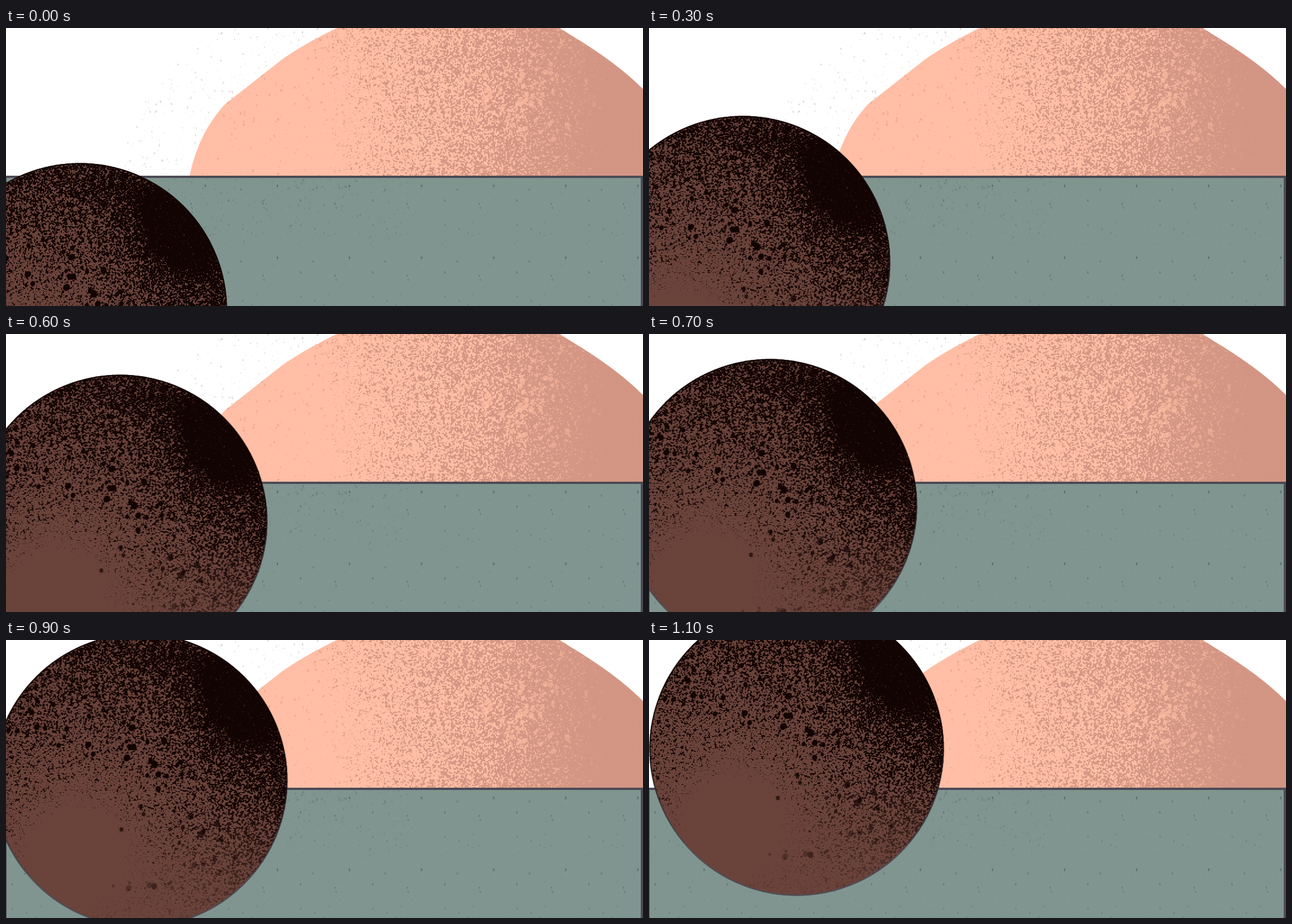
These frames come from a looping animation (1131 by 495 pixels, 1.2 s). An HTML page with a canvas:

```html
<!DOCTYPE html>
<html lang="en">
<head>
<meta charset="utf-8">
<title>Rising ball</title>
<style>
  html, body { margin: 0; width: 100%; height: 100%; overflow: hidden; background: #fff; }
  #stage { position: relative; width: 1131px; height: 495px; overflow: hidden; }
  canvas { position: absolute; left: 0; top: 0; display: block; }
</style>
</head>
<body>
<div id="stage">
  <canvas id="scene" width="1131" height="495"></canvas>
  <canvas id="ball" width="526" height="526"></canvas>
</div>
<script>
const W = 1131, H = 495, HORIZON = 263;
const SIZE = 526, C = SIZE / 2, R = 261.5;
const scene = document.getElementById('scene').getContext('2d');
const ballEl = document.getElementById('ball');
const ball = ballEl.getContext('2d');

const clamp = (v, lo = 0, hi = 1) => Math.max(lo, Math.min(hi, v));
const lerp = (a, b, t) => a + (b - a) * t;
const bell = (x, y, w, h) => Math.exp(-((x / w) ** 2 + (y / h) ** 2));
function smooth(a, b, x) {
  const t = clamp((x - a) / (b - a));
  return t * t * (3 - 2 * t);
}

function seeded(seed) {
  return () => (seed = (Math.imul(seed, 1664525) + 1013904223) >>> 0) / 4294967296;
}

function hash(x, y) {
  let n = Math.imul(x, 374761393) + Math.imul(y, 668265263);
  n = Math.imul(n ^ (n >>> 13), 1274126177);
  return ((n ^ (n >>> 16)) >>> 0) / 4294967296;
}

function noise(x, y) {
  const i = Math.floor(x), j = Math.floor(y), u = x - i, v = y - j;
  return lerp(lerp(hash(i, j), hash(i + 1, j), u),
              lerp(hash(i, j + 1), hash(i + 1, j + 1), u), v);
}

// Sprayed grain; shade(x, y) gives [coverage, opacity]
function grain(w, h, cell, rgb, shade) {
  const c = document.createElement('canvas');
  c.width = w;
  c.height = h;
  const g = c.getContext('2d'), img = g.createImageData(w, h);
  for (let y = 0, k = 0; y < h; y++) {
    for (let x = 0; x < w; x++, k += 4) {
      const [cover, alpha] = shade(x, y);
      const d = clamp(cover, 0.001, 0.985);
      const cut = 0.5 + Math.log(d / (1 - d)) / 9;
      const a = clamp((cut - noise(x / cell, y / cell)) * 8 + 0.5);
      img.data.set([...rgb, 255 * a * alpha], k);
    }
  }
  g.putImageData(img, 0, 0);
  return c;
}

function fleck(g, x, y, r, rnd, flat = 0.55) {
  g.beginPath();
  g.ellipse(x, y, r, r * flat, 1 + rnd() * 1.6, 0, 7);
  g.fill();
}

function drawDust() {
  const rnd = seeded(11);
  for (let i = 0; i < 1200; i++) {
    const a = Math.PI * (1 + rnd() / 2), r = 365 - 230 * rnd();
    const x = 560 + Math.cos(a) * r, y = 318 + Math.sin(a) * r;
    scene.fillStyle = `rgba(150,128,120,${0.1 + rnd() * 0.28})`;
    fleck(scene, x, y, 0.5 + rnd() ** 4 * 2, rnd);
  }
}

function drawHill() {
  const rnd = seeded(5);
  scene.save();
  scene.clip(new Path2D(`M326 264C335 220 352 178 385 140Q390 134 400 127
    L490 56Q525 31 587 0H983L1000 11Q1085 62 1131 109V264Z`));
  scene.fillStyle = '#ffbea5';
  scene.fillRect(320, 0, W, HORIZON);

  scene.fillStyle = 'rgba(211,149,131,.5)';
  for (let i = 0; i < 520; i++) {
    fleck(scene, 330 + rnd() * 340, rnd() * 264, 0.6 + rnd() ** 4 * 2.2, rnd);
  }
  const left = 480;
  scene.drawImage(grain(W - left, 264, 2.1, [211, 149, 131], (x, y) => {
    const lift = 60 * clamp(1 - y / 110) * clamp((400 - x) / 250);
    return [smooth(520, 1120, left + x + lift), 0.95];
  }), left, 0);

  const veil = scene.createLinearGradient(860, 0, 1090, 0);
  veil.addColorStop(0, 'rgba(211,149,131,0)');
  veil.addColorStop(1, 'rgba(211,149,131,.85)');
  scene.fillStyle = veil;
  scene.fillRect(860, 0, W - 860, 264);

  for (let i = 0; i < 90; i++) {
    const x = 780 + (rnd() + rnd()) * 140, y = 20 + (rnd() + rnd()) * 105;
    scene.fillStyle = `rgba(250,184,158,${clamp((1090 - x) / 230, 0.1, 0.75)})`;
    fleck(scene, x, y, 1.5 + rnd() * 4, rnd, 0.85);
  }
  scene.restore();
}

function drawFloor() {
  const rnd = seeded(29), tile = 128;
  scene.fillStyle = '#80958f';
  scene.fillRect(0, HORIZON, W, H - HORIZON);
  scene.fillStyle = '#4c4a55';
  scene.fillRect(0, HORIZON, W, 4);
  scene.fillRect(W - 4, HORIZON, 4, H - HORIZON);
  scene.fillRect(0, HORIZON, 1, H - HORIZON);

  // The same specks repeat in every tile
  for (let i = 0; i < 70; i++) {
    const x = rnd() * tile, y = rnd() * tile, big = rnd() ** 5;
    scene.fillStyle = `rgba(62,78,78,${0.08 + rnd() * 0.14 + big * 0.3})`;
    for (let ty = 256 + y; ty < H; ty += tile) {
      if (ty < HORIZON + 1) continue;
      for (let tx = x; tx < W; tx += tile) fleck(scene, tx, ty, 0.6 + big * 1.8, seeded(i));
    }
  }
  for (let i = 0; i < 380; i++) {
    scene.fillStyle = `rgba(80,105,102,${0.15 + rnd() * 0.3})`;
    fleck(scene, 270 + rnd() * 450, 268 + rnd() ** 1.6 * 120, 0.6 + rnd() ** 3 * 2.2, rnd);
  }
}

function drawBall() {
  const rnd = seeded(71), dark = [18, 4, 2], top = 70;
  const fade = y => clamp(1 - (y - 260) / 270, 0.1, 1);
  ball.save();
  ball.beginPath();
  ball.arc(C, C, R, 0, 7);
  ball.clip();
  ball.fillStyle = '#6a433b';
  ball.fillRect(0, 0, SIZE, SIZE);

  // Coverage grows away from the lit lower left, with a dense core upper right
  ball.drawImage(grain(SIZE, SIZE, 2, dark, (x, y) => {
    const far = clamp((Math.hypot(x - 150, y - 395) - 60) / 330);
    const low = 1 - 0.45 * smooth(300, 520, y);
    return [0.8 * far ** 1.6 * low + 0.42 * bell(x - 425, y - 135, 85, 95), fade(y - 40)];
  }), 0, 0);

  // Drops spread around a line that slopes down to the right
  const drops = (n, x0, y0, w, h, slope) => {
    for (let i = 0; i < n; i++) {
      const x = rnd() * w, y = y0 + x * slope + (rnd() + rnd() - 1) * h;
      ball.fillStyle = `rgba(${dark},${fade(y)})`;
      fleck(ball, x0 + x, y, 2 + rnd() ** 2 * 5, rnd, 0.85);
    }
  };
  drops(70, 20, 130, 360, 75, 0.3);
  drops(22, 205, 310, 230, 60, 0.4);
  drops(10, 195, 455, 125, 10, -0.05);
  ball.restore();

  const edge = ball.createLinearGradient(0, 240, 0, 440);
  edge.addColorStop(0, '#120605');
  edge.addColorStop(1, '#4c4e5b');
  ball.strokeStyle = edge;
  ball.lineWidth = 2;
  ball.beginPath();
  ball.arc(C, C, R - 1, 0, 7);
  ball.stroke();
}

drawDust();
drawHill();
drawFloor();
drawBall();

// Twelve held poses per loop along a straight line
const at = (cx, cy) => `translate(${cx - C}px, ${cy - C}px)`;
ballEl.animate(
  [{ transform: at(131, 502) }, { transform: at(274, 166) }],
  { duration: 1200, iterations: Infinity, easing: 'steps(12, end)' }
);
</script>
</body>
</html>
```
